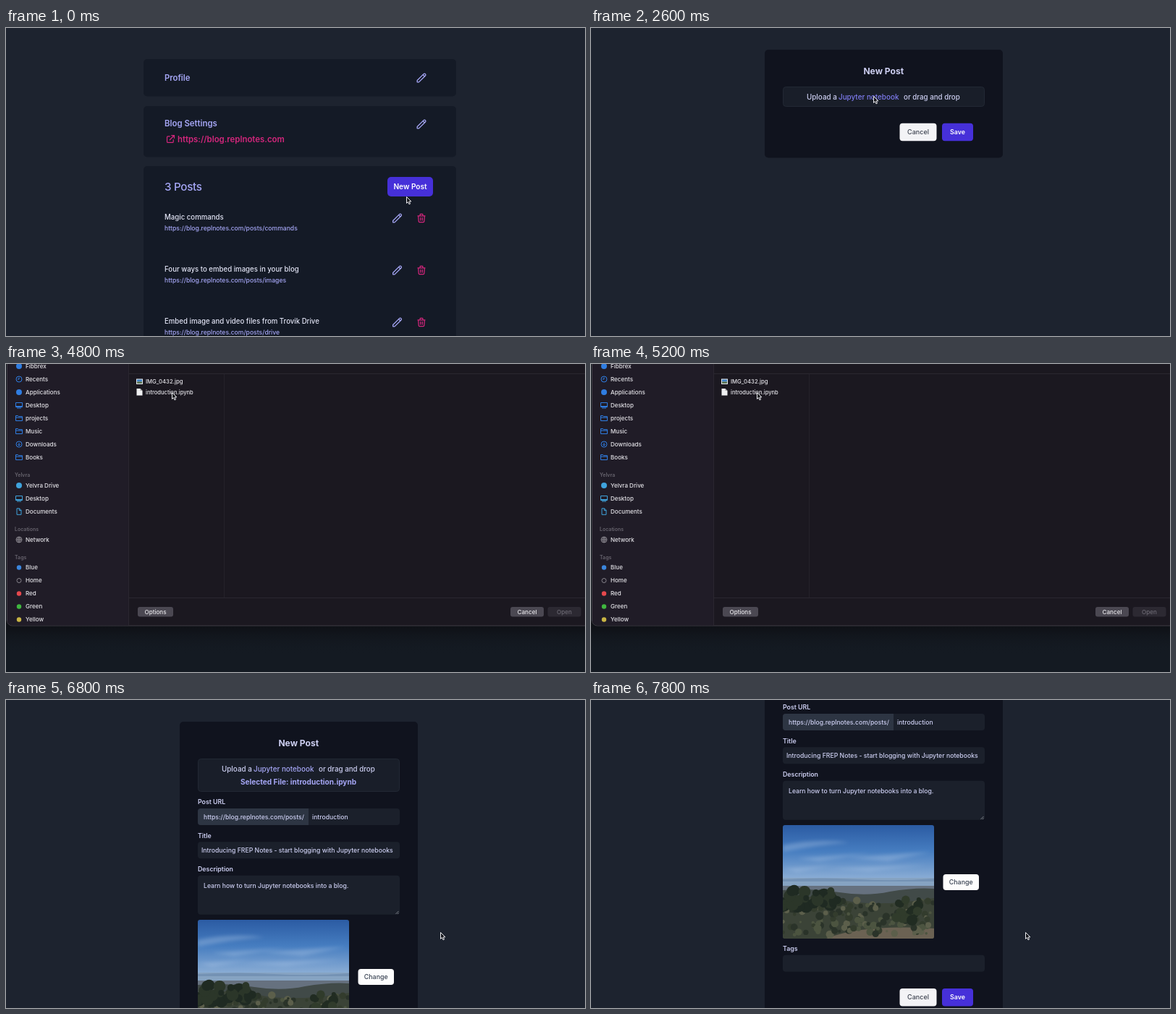
An HTML page that plays this animation: 800x426 px, repeating every 8 s.

```html
<!DOCTYPE html>
<html lang="en">
<head>
<meta charset="utf-8">
<title>New post</title>
<style>
  html, body { margin: 0; width: 100%; height: 100%; overflow: hidden; background: #1d232f; }
  svg { display: block; width: 100vw; height: 100vh; font-family: Inter, sans-serif; }
  text { white-space: pre; }
  .icon { fill: none; stroke-width: 2; stroke-linecap: round; stroke-linejoin: round; }
  .glyph { fill: none; stroke-width: 1; stroke-linejoin: round; }
</style>
</head>
<body>
<svg id="stage" viewBox="0 0 800 426"></svg>
<script>
const LAVENDER = '#a5a6f5', PALE = '#cdcff2', PINK = '#d3267c', INDIGO = '#4630d9', BLUE = '#2f7de1', CYAN = '#3fa3dc';
const SITE = 'https://blog.replnotes.com';

const text = (x, y, size, str, fill, weight = 500, attrs = '') =>
  `<text x="${x}" y="${y}" font-size="${size}" fill="${fill}" font-weight="${weight}" ${attrs}>${str}</text>`;
const box = (x, y, w, h, r, fill, attrs = '') =>
  `<rect x="${x}" y="${y}" width="${w}" height="${h}" rx="${r}" fill="${fill}" ${attrs}/>`;
const dot = (x, y, r, fill, attrs = '') => `<circle cx="${x}" cy="${y}" r="${r}" fill="${fill}" ${attrs}/>`;
const group = (id, content, attrs = '') => `<g id="${id}" ${attrs}>${content}</g>`;
const button = (x, y, w, h, label, fill, color, size, weight, r = 4) =>
  box(x, y, w, h, r, fill) +
  text(x + w / 2, y + h / 2 + size * 0.36, size, label, color, weight, 'text-anchor="middle"');

// Outline icons on a 24-unit grid, centred on (x, y)
const ICONS = {
  pencil: 'M15.2 5.2l3.6 3.6m-2.1-5.1a2.5 2.5 0 113.6 3.6L6.5 21H3v-3.5L16.7 3.7z',
  trash: 'M19 7l-.9 12.1A2 2 0 0116.1 21H7.9a2 2 0 01-2-1.9L5 7m5 4v6m4-6v6m1-10V4a1 1 0 00-1-1h-4a1 1 0 00-1 1v3M4 7h16',
  link: 'M10 6H6a2 2 0 00-2 2v10a2 2 0 002 2h10a2 2 0 002-2v-4M14 4h6m0 0v6m0-6L10 14'
};
const icon = (name, x, y, color, scale = 0.62) =>
  `<path class="icon" d="${ICONS[name]}" stroke="${color}" transform="translate(${x} ${y}) scale(${scale}) translate(-12 -12)"/>`;

// Sidebar glyphs, centred on the origin
const line = (d, color) => `<path class="glyph" d="${d}" stroke="${color}"/>`;
const ring = color => dot(0, 0, 4, 'none', `stroke="${color}"`);
const GLYPHS = {
  disc: color => dot(0, 0, 4, color),
  clock: color => ring(color) + line('M0-2.5V0H-2', color),
  screen: color => line('M-4.5-3.5h9v6h-9zM-3 4h6', color) + box(-4, 1, 8, 1.5, 0, color),
  folder: color => line('M-4.5 3.5v-7h3l1 1.2h5v5.8zM-4.5-1h9', color),
  down: color => ring(color) + line('M0-2v4M-1.8.3L0 2 1.8.3', color),
  page: color => line('M-3-4.2h3.5L3-1.7v6h-6zM.3-4.2v2.8H3', color),
  globe: color => ring(color) + line('M-4 0h8M0-4v8M0-4q-4 4 0 8q4-4 0-8', color),
  tag: color => dot(0, 0, 3.2, color),
  hollow: color => dot(0, 0, 3, 'none', `stroke="${color}"`)
};
const row = (y, [label, glyph, color]) =>
  `<g transform="translate(18 ${y})">${GLYPHS[glyph](color)}</g>` + text(27, y + 2.9, 8.05, label, '#e4e3e8');
const section = (y, title, rows) =>
  (title ? text(12, y - 12, 7, title, '#67646e', 600) : '') + rows.map((r, i) => row(y + i * 18, r)).join('');

const FAVORITES = [['Fibbrex', 'disc', BLUE], ['Recents', 'clock', BLUE], ['Applications', 'disc', BLUE],
  ['Desktop', 'screen', BLUE], ['projects', 'folder', BLUE], ['Music', 'folder', BLUE],
  ['Downloads', 'down', BLUE], ['Books', 'folder', BLUE]];
const REMOTE = [['Yelvra Drive', 'disc', CYAN], ['Desktop', 'screen', CYAN], ['Documents', 'page', CYAN]];
const TAGS = [['Blue', 'tag', '#3b86dd'], ['Home', 'hollow', '#85828a'], ['Red', 'tag', '#e5484d'],
  ['Green', 'tag', '#3fb73f'], ['Yellow', 'tag', '#c9b544'], ['Orange', 'tag', '#ee8a2c'], ['Purple', 'tag', '#a558dc']];
const sidebar = (tagsY, extra = '') =>
  section(3, '', FAVORITES) + section(168, 'Yelvra', REMOTE) + extra + section(tagsY, 'Tags', TAGS);

const post = (y, title, slug) =>
  text(219, y + 3.5, 9.65, title, '#e3e5f6') +
  text(219, y + 18.7, 8.6, `${SITE}/posts/${slug}`, LAVENDER) +
  icon('pencil', 540.5, y + 2, LAVENDER, 0.65) + icon('trash', 574, y + 2, PINK);

const list =
  box(190, 43, 432, 51.5, 5, '#141a26') + box(190, 108, 432, 70.5, 5, '#141a26') + box(190, 191, 432, 260, 5, '#141a26') +
  text(219, 73, 11.3, 'Profile', LAVENDER, 600) + icon('pencil', 574, 69, LAVENDER, 0.65) +
  text(219, 136, 11.4, 'Blog Settings', LAVENDER, 600) + icon('pencil', 574, 133, LAVENDER, 0.65) +
  icon('link', 227.5, 153.5, PINK) + text(237, 157.5, 11.4, SITE, PINK, 600) +
  text(219, 225.3, 15.2, '3 Posts', LAVENDER, 500, 'letter-spacing="-.3"') +
  button(527, 206, 63, 27, 'New Post', INDIGO, '#fff', 10.1, 600, 5) +
  post(261, 'Magic commands', 'commands') +
  post(333, 'Four ways to embed images in your blog', 'images') +
  post(405, 'Embed image and video files from Trovik Drive', 'drive');

const field = (y, label, h) => text(265, y, 8.8, label, PALE, 600) + box(265, y + 5.7, 279, h, 4, '#1b202b');

let seed = 7;
const random = () => (seed = seed * 16807 % 2147483647) / 2147483647;
const bushes = (count, x, y, w, h, size, colors) => Array.from({ length: count }, (_, i) =>
  dot(x + w * random(), y + h * random(), size * (0.4 + random()), colors[i % colors.length])).join('');

const photo = `<g clip-path="url(#photoClip)" transform="translate(265 304)">
  ${box(0, 0, 209, 90, 0, 'url(#sky)')}
  <g fill="#bdd2ec" opacity=".3" filter="url(#soft)">
    <path d="M0 28q45-10 92-4q-40 3-92 13zM20 46l100-7-70 11zM90 45l115-8-60 13zM60 60l140-5-80 9zM0 60l70-4-50 9z"/>
  </g>
  ${box(0, 73, 209, 12, 0, '#86a3c2')}${box(0, 84, 209, 16, 0, '#66717f')}
  <path d="M0 75q55-3 105 0t104-1v4H0z" fill="#7492b4"/>
  <path d="M0 90q40-3 78 3t70-1q35-6 61-4v69H0z" fill="#414a48"/>
  <path d="M0 104q40-10 85 0t124-3v56H0z" fill="#3b4337"/>
  <path d="M60 157q50-20 149-14v14z" fill="#6b6253"/>
  ${bushes(140, 0, 104, 209, 48, 4, ['#333c2d', '#4c5440', '#2a3329', '#5c5f4b'])}
  ${bushes(36, 0, 90, 80, 24, 8, ['#1f2a22', '#2b3629'])}
  ${bushes(24, 156, 102, 32, 30, 6, ['#212c22', '#303b2b'])}
</g>`;

const form =
  box(240, 30, 329, 149, 5, '#10131e', 'id="modal"') +
  text(404.3, 64.2, 12.1, 'New Post', PALE, 700, 'text-anchor="middle"') +
  box(265.5, 81.5, 278, 27, 4, '#191e29', 'id="upload" stroke="#222834"') +
  text(298, 99, 9.85, 'Upload a', PALE) +
  text(342, 99, 9.9, 'Jupyter notebook', LAVENDER, 500, 'id="hoverLink"') +
  text(432, 99, 9.75, 'or drag and drop', PALE) +
  group('fields',
    text(404, 117, 10.1, 'Selected File: introduction.ipynb', LAVENDER, 700, 'text-anchor="middle"') +
    field(144.2, 'Post URL', 23) +
    '<path d="M269 150h149v23H269a4 4 0 01-4-4V154a4 4 0 014-4z" fill="#2d3543"/>' +
    text(273, 164.6, 8.65, SITE + '/posts/', PALE) +
    field(190.5, 'Title', 23) + field(237, 'Description', 54) +
    '<path d="M538.5 296l4-4M541 296l1.5-1.5" stroke="#9a9da5" stroke-width=".8"/>' +
    group('urlValue', text(423, 164.6, 8.65, 'introduction', PALE)) +
    group('titleValue', text(270, 211, 8.7, 'Introducing FREP Notes - start blogging with Jupyter notebooks', PALE)) +
    group('aboutValue', text(273, 259.8, 8.65, 'Learn how to turn Jupyter notebooks into a blog.', PALE)) +
    group('cover', photo + button(486.5, 372, 49.5, 22, 'Change', '#fdfdfd', '#374151', 8.9, 500)) +
    group('tags', field(314.3, 'Tags', 23))) +
  group('actions',
    button(426.5, 0, 51, 24.5, 'Cancel', '#f3f3f6', '#3d4350', 9, 500) +
    button(485, 0, 43, 24.5, 'Save', INDIGO, '#fff', 8.8, 600));

const dialog =
  box(0, 0, 800, 426, 0, '#141a22') + box(0, 355, 800, 45, 0, 'url(#shade)') +
  box(1.5, -20, 820, 382, 7, '#1b1820', 'stroke="#3f3d45"') +
  '<path d="M2-1H169V361.5H9a7 7 0 01-7-7z" fill="#201c27"/>' +
  '<path d="M169.5 0V361M170 13.5H800M170 323.5H800" stroke="#2a2730"/><path d="M301.5 14V323" stroke="#24212a"/>' +
  `<g clip-path="url(#sideClip)">${
    group('sideLoading', sidebar(242.5), 'transform="translate(0 -.5)"') +
    group('sideReady', sidebar(281.5, section(243, 'Locations', [['Network', 'globe', '#86838b']])))}</g>` +
  group('files',
    box(180, 20.5, 9, 7.5, 0, '#e6e9ee') + box(181, 21.5, 7, 3, 0, '#3e80c4') + box(181, 24.5, 7, 2.5, 0, '#56704f') +
    text(193, 27.2, 7.7, 'IMG_0432.jpg', '#e4e3e8') +
    '<path d="M180.5 34h5l3 3v6.5h-8z" fill="#efeff1"/><path d="M185.5 34v3h3" fill="#aaa"/>' +
    text(193, 41.5, 7.55, 'introduction.ipynb', '#e4e3e8')) +
  button(182, 336, 49, 13.5, 'Options', '#4b4852', '#e8e7eb', 8.1, 500, 3) +
  button(697, 336, 46, 13.5, 'Cancel', '#4b4852', '#e8e7eb', 8.1, 500, 3) +
  button(748.5, 336, 46, 13.5, 'Open', '#2c2932', '#6c6973', 8.1, 500, 3);

const gradient = (id, ...stops) => `<linearGradient id="${id}" x2="0" y2="1">${
  stops.map(([at, color, alpha = 1]) => `<stop offset="${at}" stop-color="${color}" stop-opacity="${alpha}"/>`).join('')}</linearGradient>`;

const stage = document.getElementById('stage');
stage.innerHTML = `<defs>
  ${gradient('sky', [0, '#2b5ba3'], [0.4, '#467dc0'], [0.85, '#8fb0d6'])}
  ${gradient('shade', [0, '#0e1015'], [0.3, '#101319'], [1, '#141a22', 0])}
  <filter id="soft"><feGaussianBlur stdDeviation="2.5"/></filter>
  <clipPath id="photoClip"><rect width="209" height="157" rx="3"/></clipPath>
  <clipPath id="sideClip"><rect width="169" height="361"/></clipPath></defs>` +
  box(0, 0, 800, 426, 0, '#1d232f') + group('list', list) + group('form', form) + group('dialog', dialog) +
  group('cursor', '<path d="M.5.5V9.4L2.500 7.500 4 10.800 5.500 10.100 4.100 6.900H6.900z" fill="#15161b" stroke="#ececf0" stroke-linejoin="round"/>'.replace(/(\.\d)00/g, '$1'));

const el = {};
stage.querySelectorAll('[id]').forEach(node => el[node.id] = node);
const show = (name, on) => el[name].style.display = on ? '' : 'none';
const shift = (name, x, y) => el[name].setAttribute('transform', `translate(${x} ${y})`);
const progress = (t, from, to) => Math.min(1, Math.max(0, (t - from) / (to - from)));
const ease = p => p * p * (3 - 2 * p);

// Pointer moves: start, end, destination
const MOVES = [[0, 600, 556, 220], [1600, 2600, 390, 94], [3800, 4800, 229, 39], [5600, 6600, 600, 321]];
function pointer(t) {
  let x = 553, y = 233;
  for (const [from, to, nextX, nextY] of MOVES) {
    const p = ease(progress(t, from, to));
    x += (nextX - x) * p;
    y += (nextY - y) * p;
  }
  return [x, y];
}

function draw(t) {
  const picking = t >= 3200 && t < 5400, picked = t >= 5400, loaded = t >= 3800, covered = t >= 6600;
  show('list', t < 800);
  show('form', t >= 800 && !picking);
  show('dialog', picking);

  show('fields', picked);
  show('urlValue', t >= 6000);
  show('titleValue', t >= 6200);
  show('aboutValue', t >= 6400);
  show('cover', covered);
  el.modal.setAttribute('height', covered ? 547 : picked ? 383.5 : 149.5);
  el.upload.setAttribute('height', picked ? 45 : 27);
  el.hoverLink.setAttribute('fill', t >= 2600 && t < 3200 ? '#7f7cf0' : LAVENDER);
  shift('tags', 0, covered ? 163.7 : 0);
  shift('actions', 0, covered ? 530 : picked ? 366 : 131.7);
  shift('form', 0, -131 * ease(progress(t, 6800, 7800)));

  show('sideLoading', !loaded);
  show('sideReady', loaded);
  el.files.setAttribute('opacity', loaded ? 1 : 0.35);
  shift('cursor', ...pointer(t));
}

function tick() {
  draw(Math.floor(performance.now() % 8000 / 200) * 200);
  requestAnimationFrame(tick);
}
tick();
</script>
</body>
</html>
```
